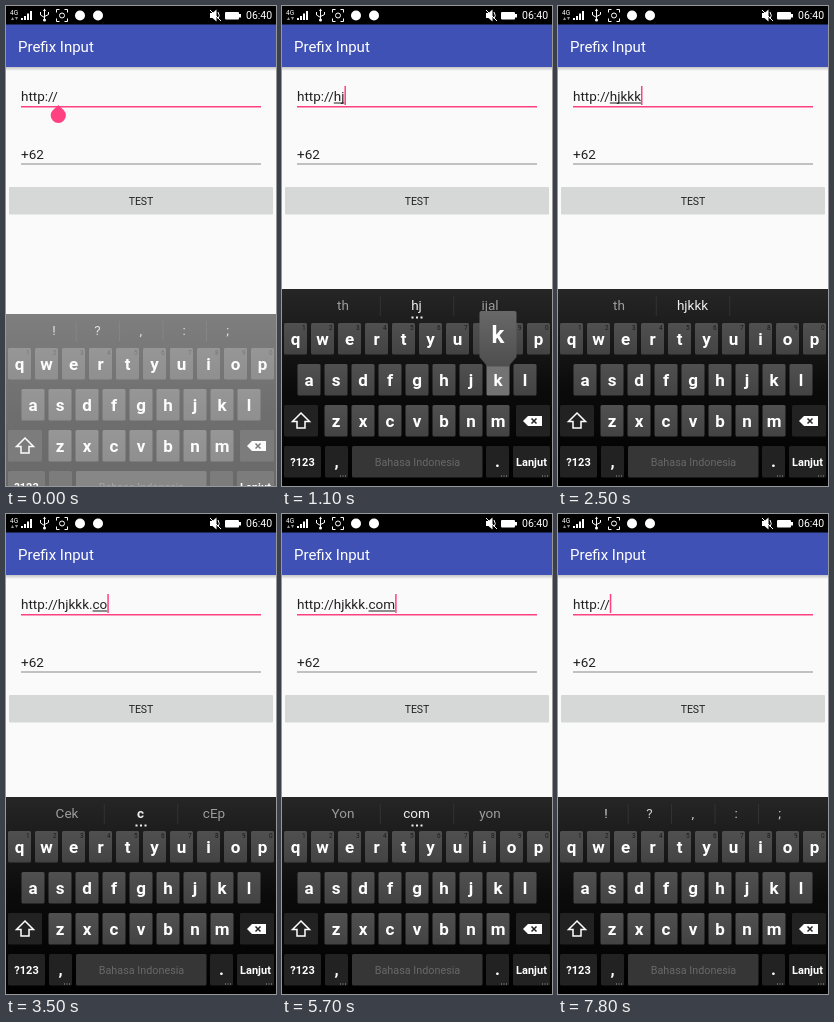
An HTML page for the animation above (8000 ms loop, 270 by 480 pixels).

```html
<!DOCTYPE html>
<html>
<head>
<meta charset="utf-8">
<style>
html, body { margin: 0; width: 100%; height: 100%; overflow: hidden; background: #fafafa; }
svg { display: block; width: 270px; height: 480px; font: 13.5px Roboto, sans-serif; }
.mid { text-anchor: middle; }
.key { fill: url(#keyFill); }
.dark { fill: #222; }
.space { fill: #363636; }
.down { fill: #737373; }
.letter { font-weight: bold; font-size: 17px; fill: #fff; text-anchor: middle; }
.label { font-weight: bold; font-size: 11px; fill: #fff; text-anchor: middle; }
.hint { font-size: 6.5px; fill: #1c1c1c; }
</style>
</head>
<body>
<svg viewBox="0 0 270 480">
  <defs>
    <linearGradient id="board" x2="0" y2="1">
      <stop stop-color="#262626"/><stop offset=".5" stop-color="#0b0b0b"/><stop offset="1"/>
    </linearGradient>
    <linearGradient id="keyFill" x2="0" y2="1">
      <stop stop-color="#505050"/><stop offset="1" stop-color="#434343"/>
    </linearGradient>
    <linearGradient id="popFill" x2="0" y2="1">
      <stop stop-color="#686868"/><stop offset="1" stop-color="#4e4e4e"/>
    </linearGradient>
    <linearGradient id="shadow" x2="0" y2="1">
      <stop stop-opacity=".22"/><stop offset="1" stop-opacity="0"/>
    </linearGradient>
  </defs>
  <rect width="270" height="480" fill="#fafafa"/>
  <rect y="61" width="270" height="4" fill="url(#shadow)"/>
  <rect y="18" width="270" height="43" fill="#3f51b5"/>
  <text x="12" y="45.5" font-size="15" fill="#fff">Prefix Input</text>

  <!-- status bar -->
  <rect width="270" height="18.5"/>
  <g fill="#fff">
    <text x="4" y="9" font-size="6.5">4G</text>
    <path d="M5 14l1.5-3 1.5 3zM9 11h3l-1.5 3z" fill="#999"/>
    <path d="M15 12h2v2h-2zM18 10h2v4h-2zM21 7.500h2v6.500h-2zM24 5h2v9h-2z"/>
    <circle cx="38.500" cy="14" r="1.500"/>
    <path d="M37 5l1.500-2.500 1.500 2.500z"/>
    <circle cx="74" cy="9.500" r="5"/>
    <circle cx="92" cy="9.500" r="5"/>
    <path d="M204 7h2.500l4-3.500v12l-4-3.500H204z"/>
    <rect x="219" y="6" width="14" height="7.500" rx="1"/>
    <rect x="233" y="8" width="2" height="3.500"/>
    <text x="240" y="13.300" font-size="10.500">06:40</text>
  </g>
  <g fill="none" stroke="#fff">
    <path d="M38.500 14V4M34.500 6v3l4 2.500M42.500 6v2.500l-4 2"/>
    <path d="M50.500 6.500v-3h3M58.500 3.500h3v3M61.500 12.500v3h-3M53.500 15.500h-3v-3"/>
    <circle cx="56" cy="9.500" r="2.500"/>
    <path d="M204 4l11 11M212 6q2.500 3.500 0 7"/>
  </g>

  <!-- form -->
  <g fill="#212121">
    <text id="url" x="15" y="95"></text>
    <text x="15" y="153">+62</text>
  </g>
  <rect x="15" y="100" width="240" height="1.500" fill="#ff4081"/>
  <rect x="15" y="157.500" width="240" height="1" fill="#8a8a8a"/>
  <rect x="3" y="181" width="264" height="27.500" rx="1" fill="#d6d7d7"/>
  <text class="mid" x="135" y="198.700" font-size="10.500" fill="#212121">TEST</text>
  <rect id="underline" y="96.500" height="1" fill="#212121"/>
  <rect id="caret" y="80" width="1.500" height="19" fill="#ff4081"/>
  <path id="handle" d="M0 99l5.500 5.200a7.600 7.600 0 1 1-11 0z" fill="#ff4081"/>

  <g id="keyboard">
    <rect y="283" width="270" height="197" fill="url(#board)"/>
    <g id="strip"></g>
    <g id="keys"></g>
    <g id="popup">
      <path d="M-18.500 2q0-2 2-2h33q2 0 2 2v44l-8 9.500h-21l-8-9.500z" fill="url(#popFill)"/>
      <text class="mid" y="32" font-size="24" font-weight="bold" fill="#fff"></text>
    </g>
  </g>
</svg>
<script>
const $ = id => document.getElementById(id);
const LOOP = 8000, TICK = 100, PREFIX = 'http://', PUNCTUATION = '! ? , : ;';
const keyPos = {};

function key(id, x, y, w, kind, content = '') {
  keyPos[id] = { x: x + w / 2, y };
  return `<rect id="key${id}" class="${kind}" x="${x}" y="${y}" width="${w}" height="31.5" rx="1.5"/>${content}`;
}

const label = (text, x, y, kind = 'label') => `<text class="${kind}" x="${x}" y="${y}">${text}</text>`;

function letterRow(letters, x0, y, hints = '') {
  return [...letters].map((c, i) => {
    const x = x0 + 27 * i;
    return key(c, x, y, 23, 'key',
      label(c, x + 11.5, y + 21.5, 'letter') + label(hints[i] || '', x + 18, y + 7, 'hint'));
  }).join('');
}

const moreDots = x => `<path d="M${x} 470h6" stroke="#999" stroke-dasharray="1 1.500"/>`;

$('keys').innerHTML =
  letterRow('qwertyuiop', 2, 317, '1234567890') +
  letterRow('asdfghjkl', 15.5, 358) +
  letterRow('zxcvbnm', 42.5, 399) +
  key('shift', 2, 399, 34, 'dark',
    '<path d="M19 407l8.500 8.500h-4.500v6.500h-8v-6.500h-4.500z" fill="none" stroke="#fff" stroke-width="1.500"/>') +
  key('del', 234, 399, 34, 'dark',
    '<path d="M241 415l5-5h14v10h-14z" fill="#fff"/><path d="M249.500 412.500l5 5m0-5l-5 5" stroke="#222" stroke-width="1.500"/>') +
  key('sym', 2, 440, 37, 'dark', label('?123', 20.5, 460)) +
  key('comma', 43, 440, 23, 'dark', label(',', 54.5, 461, 'letter') + moreDots(58)) +
  key('space', 70, 440, 130.5, 'space',
    '<text class="mid" x="135.500" y="460" font-size="10.800" fill="#686868">Bahasa Indonesia</text>') +
  key('.', 204, 440, 23, 'dark', label('.', 215.5, 461, 'letter') + moreDots(219)) +
  key('next', 231, 440, 37, 'dark', label('Lanjut', 249.5, 460) + moreDots(260));

// Each step changes part of the state; a new text or caret restarts the blinking.
const type = (tail, start = PREFIX.length) =>
  ({ text: PREFIX + tail, caret: 7 + tail.length, word: [start, 7 + tail.length], handle: false });
const press = (k, pop = k) => ({ key: k, pop });
const release = press('');

const steps = [
  [0, { ...type(''), handle: true, edit: -500, words: PUNCTUATION, dots: false, ...release }],
  [600, press('h')],
  [700, { ...type('h'), ...press('', 'h') }],
  [800, { ...release, words: 'hanya h hari', dots: true }],
  [900, press('j')],
  [1000, { ...type('hj'), ...release, words: 'th hj ijal' }],
  [1100, press('k')],
  [1200, type('hjk')],
  [1300, { ...type('hjkk'), ...press('', 'k'), words: 'th hjk', dots: false }],
  [1400, { ...release, words: 'th hjkk' }],
  [1500, type('hjkkk')],
  [1600, { words: 'th hjkkk' }],
  [2700, { ...type('hjkkk.', 13), ...press('.') }],
  [2800, { ...release, words: PUNCTUATION }],
  [3100, press('c')],
  [3200, { ...type('hjkkk.c', 13), ...release }],
  [3300, { ...press('o'), words: 'Cek c cEp', dots: true }],
  [3400, { ...type('hjkkk.co', 13), ...press('', 'o') }],
  [3500, release],
  [3600, { ...type('hjkkk.com', 13), ...press('m') }],
  [3700, { ...release, words: 'Yon com yon' }],
  [4400, { caret: 1, word: [0, 0], handle: true }],
  [4500, { caret: 1, word: [0, 4], words: 'Http http htp' }],
  [5500, press('i')],
  [5600, { ...type('hjkkk.com', 13), ...release }],
  [5700, { words: 'Yon com yon' }],
  [6500, { key: 'del', edit: 5700 }],
  [7000, type('hjkkk.co', 13)],
  [7100, { ...type('hjkkk.', 13), words: 'Cek c cEp' }],
  [7200, { ...type('hjkk', 11), words: '', dots: false }],
  [7300, type('hjk', 10)],
  [7400, type('h', 8)],
  [7500, { ...type(''), words: PUNCTUATION }],
  [7800, release]
];

function stateAt(t) {
  const state = {};
  for (const [time, change] of steps) {
    if (time > t) break;
    if ('caret' in change) state.edit = time;
    Object.assign(state, change);
  }
  return state;
}

function stripMarkup({ words, dots }) {
  const list = words.split(' '), symbols = words === PUNCTUATION;
  const first = symbols ? 48 : 61, pitch = symbols ? 43.4 : 73.5;
  let out = '';
  for (let i = 0; i < (symbols ? 5 : 3); i++) {
    const x = first + pitch * i, main = !symbols && i === 1;
    const fill = symbols ? '#d0d0d0' : main ? '#eee' : '#9c9c9c';
    const weight = main && list[i] === 'c' ? 'bold' : 'normal';
    out += `<text class="mid" x="${x}" y="304" fill="${fill}" font-weight="${weight}">${list[i] || ''}</text>`;
    if (i) out += `<rect x="${x - pitch / 2}" y="290" width="1" height="20" fill="#333"/>`;
  }
  return out + (dots ? '<path d="M129.500 311.500h11" stroke="#eee" stroke-width="2" stroke-dasharray="2 2.500"/>' : '');
}

function set(id, attrs) {
  for (const name in attrs) $(id).setAttribute(name, attrs[name]);
}

function draw(t) {
  const s = stateAt(t), url = $('url');
  url.textContent = s.text;
  const xAt = n => 15 + (n ? url.getSubStringLength(0, n) : 0);
  const [from, to] = s.word.map(xAt), x = xAt(s.caret);
  set('underline', { x: from, width: to - from });
  set('caret', { x, visibility: (t - s.edit) % 1000 < 500 ? 'visible' : 'hidden' });
  set('handle', { transform: `translate(${x + .5})`, visibility: s.handle ? 'visible' : 'hidden' });

  const shown = Math.min(1, t / 200);
  set('keyboard', { transform: `translate(0 ${25 * (1 - shown) ** 2})`, opacity: .58 + .42 * shown });
  $('strip').innerHTML = stripMarkup(s);
  document.querySelectorAll('#keys .down').forEach(k => k.classList.remove('down'));
  if (s.key) $('key' + s.key).classList.add('down');

  const at = keyPos[s.pop];
  set('popup', { visibility: at ? 'visible' : 'hidden' });
  if (at) {
    set('popup', { transform: `translate(${at.x} ${at.y - 53})` });
    $('popup').querySelector('text').textContent = s.pop;
  }
}

let last = -1;
const start = performance.now();
function frame() {
  const t = Math.floor((performance.now() - start) % LOOP / TICK) * TICK;
  if (t !== last) draw(last = t);
  requestAnimationFrame(frame);
}
frame();
</script>
</body>
</html>
```
